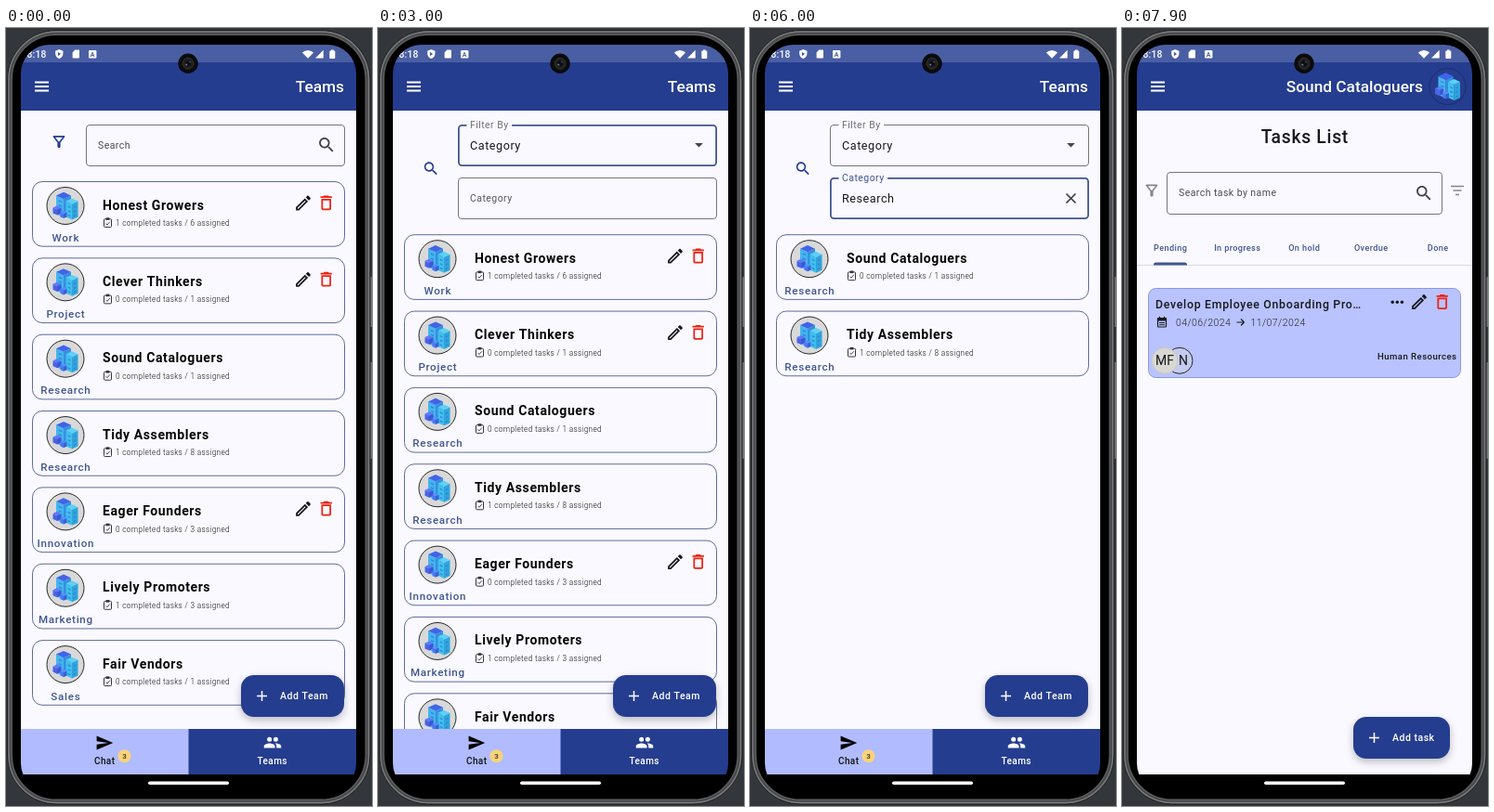
These frames come from a looping animation (394 by 838 pixels, 8000 ms). An HTML page with a canvas:

```html
<!DOCTYPE html>
<html lang="en">
<head>
<meta charset="utf-8">
<title>Teams app</title>
<style>
html, body { margin: 0; width: 100%; height: 100%; overflow: hidden; background: #33373c; }
canvas { display: block; width: 394px; height: 838px; }
</style>
</head>
<body>
<canvas id="stage"></canvas>
<script>
const W = 394, H = 838, LOOP = 8000, STEP = 100;
const NAVY = '#253d8f', SLATE = '#40568f', PAPER = '#faf9ff', INK = '#17181c', GREY = '#74757c', RED = '#f0200f';
const dpr = window.devicePixelRatio || 1;

function setup(cv) {
  cv.width = W * dpr;
  cv.height = H * dpr;
  const g = cv.getContext('2d');
  g.scale(dpr, dpr);
  return g;
}
const main = setup(document.getElementById('stage'));
const layer = document.createElement('canvas');
const over = setup(layer);
let c = main;

const icons = {
  edit: 'M14.06 9.02l.92.92L5.92 19H5v-.92l9.06-9.06M17.66 3c-.25 0-.51.1-.7.29l-1.83 1.83 3.75 3.75 1.83-1.83c.39-.39.39-1.02 0-1.41l-2.34-2.34c-.2-.2-.45-.29-.71-.29zm-3.6 3.19L3 17.25V21h3.75L17.81 9.94l-3.75-3.75z',
  bin: 'M6 19c0 1.1.9 2 2 2h8c1.1 0 2-.9 2-2V7H6v12zM8 9h8v10H8V9zm7.5-5l-1-1h-5l-1 1H5v2h14V4z',
  search: 'M15.5 14h-.79l-.28-.27C15.41 12.59 16 11.11 16 9.5 16 5.91 13.09 3 9.5 3S3 5.91 3 9.5 5.91 16 9.5 16c1.61 0 3.09-.59 4.23-1.57l.27.28v.79l5 4.99L20.49 19l-4.99-5zm-6 0C7.01 14 5 11.99 5 9.5S7.01 5 9.5 5 14 7.01 14 9.5 11.99 14 9.5 14z',
  filter: 'M7 6h10l-5.01 6.3L7 6zm-2.75-.39C6.27 8.2 10 13 10 13v6c0 .55.45 1 1 1h2c.55 0 1-.45 1-1v-6s3.72-4.8 5.74-7.39A1 1 0 0 0 18.95 4H5.04c-.83 0-1.3.95-.79 1.61z',
  send: 'M2 21l21-9L2 3v7l15 2-15 2z',
  people: 'M16 11a3 3 0 1 0 0-6 3 3 0 0 0 0 6zm-8 0a3 3 0 1 0 0-6 3 3 0 0 0 0 6zm0 2c-2.33 0-7 1.17-7 3.5V19h14v-2.5c0-2.33-4.67-3.5-7-3.5zm8 0c-.29 0-.62.02-.97.05 1.16.84 1.97 1.97 1.97 3.45V19h6v-2.5c0-2.33-4.67-3.5-7-3.5z',
  shield: 'M12 1L3 5v6c0 5.5 3.8 10.7 9 12 5.2-1.3 9-6.5 9-12V5zM9 7l7 5-7 5z',
  card: 'M18 2h-8L4 8v12c0 1.1.9 2 2 2h12c1.1 0 2-.9 2-2V4c0-1.1-.9-2-2-2z'
};
for (const k in icons) icons[k] = new Path2D(icons[k]);

function icon(name, x, y, col, s = 0.878) {
  c.save();
  c.translate(x, y);
  c.scale(s, s);
  c.translate(-12, -12);
  c.fillStyle = col;
  c.fill(icons[name], name === 'shield' ? 'evenodd' : 'nonzero');
  c.restore();
}

function text(s, x, y, size, ls, col, weight = 400, align = 'left') {
  c.font = `${weight} ${size}px Roboto, sans-serif`;
  c.letterSpacing = ls + 'px';
  c.textAlign = align;
  c.fillStyle = col;
  c.fillText(s, x + (align === 'center' ? ls / 2 : align === 'right' ? ls : 0), y);
}

function rect(x, y, w, h, col) {
  c.fillStyle = col;
  c.fillRect(x, y, w, h);
}

function paint(fill, stroke, lw) {
  if (fill) { c.fillStyle = fill; c.fill(); }
  if (stroke) { c.strokeStyle = stroke; c.lineWidth = lw; c.stroke(); }
}

function rr(x, y, w, h, r, fill, stroke, lw = 1) {
  c.beginPath();
  c.roundRect(x, y, w, h, r);
  paint(fill, stroke, lw);
}

function disc(x, y, r, fill, stroke, lw = 1) {
  c.beginPath();
  c.arc(x, y, r, 0, Math.PI * 2);
  paint(fill, stroke, lw);
}

function poly(col, ...p) {
  c.beginPath();
  for (let i = 0; i < p.length; i += 2) c.lineTo(p[i], p[i + 1]);
  paint(col);
}

function line(col, lw, ...p) {
  c.beginPath();
  for (let i = 0; i < p.length; i += 4) {
    c.moveTo(p[i], p[i + 1]);
    c.lineTo(p[i + 2], p[i + 3]);
  }
  paint(null, col, lw);
}

function shadow(blur, dy, alpha) {
  c.shadowColor = `rgba(0,0,0,${alpha})`;
  c.shadowBlur = blur * dpr;
  c.shadowOffsetY = dy * dpr;
}
const noShadow = () => { c.shadowColor = 'transparent'; };

// Isometric block: roof centre x,y, half width w, height h
function block(x, y, w, h, roof, left, right) {
  const d = w / 2.2;
  poly(left, x - w, y, x, y + d, x, y + d + h, x - w, y + h);
  poly(right, x + w, y, x, y + d, x, y + d + h, x + w, y + h);
  poly(roof, x - w, y, x, y - d, x + w, y, x, y + d);
}

function windows(x, y, w, rows) {
  for (let i = 0; i < rows; i++) {
    const v = y + i * 4.6;
    line('#2f86d2', 1.3, x - w * .65, v + 1.5, x - w * .25, v + 3, x + w * .25, v + 3, x + w * .65, v + 1.5);
  }
}

function buildings(x, y) {
  block(x - 2, y - 10, 8, 20, '#4064e8', '#45b4ee', '#368fe0');
  windows(x - 2, y - 6, 8, 3);
  block(x - 9, y + 3, 4.5, 6, '#5a7bf5', '#4a63e8', '#3f56d6');
  block(x + 7, y - 4, 6.5, 17, '#5ed0f6', '#40bfee', '#30a4dc');
  windows(x + 7, y, 6.5, 3);
  block(x - 2, y + 8, 3.5, 5, '#5a8cff', '#4778f0', '#3a5fd8');
}

function fab(x, y, w, label) {
  shadow(8, 3.5, .25);
  rr(x, y, w, 45, 14, NAVY);
  noShadow();
  const px = x + 22.5, py = y + 22.5;
  line('#fff', 1.5, px - 5.5, py, px + 5.5, py, px, py - 5.5, px, py + 5.5);
  text(label, x + 42, y + 26.3, 10.5, .5, '#fff', 500);
}

function header(title, right) {
  rect(16, 16, 361, 21, '#4a5ea3');
  rect(16, 37, 361, 52, NAVY);
  line('#fff', 1.8, 31, 58.5, 46, 58.5, 31, 63, 46, 63, 31, 67.5, 46, 67.5);
  text(title, right, 69, 17.3, 0, '#fff', 500, 'right');
}

function field(x, y, w, label, value, { focus = false, lift = 0, h = 45, col = '#4a4b52' } = {}) {
  const lw = focus ? 1.8 : 1;
  rr(x + lw / 2, y + lw / 2, w - lw, h - lw, 3.5, null, focus ? SLATE : GREY, lw);
  if (lift > .5) {
    c.font = '400 10.5px Roboto, sans-serif';
    c.letterSpacing = '.44px';
    rect(x + 9.5, y - 2, c.measureText(label).width + 7, 5, PAPER);
  }
  text(label, x + 13, y + 26.3 - 22.8 * lift, 10.5, .44, col);
  if (value) text(value, x + 13, y + 27, 12.6, .55, INK);
}

function caret(x, y, up) {
  const s = up ? -1 : 1;
  poly('#44464e', x - 4.4, y - 2.2 * s, x + 4.4, y - 2.2 * s, x, y + 2.2 * s);
}

// name, category, done, assigned, editable
const teams = [
  ['Honest Growers', 'Work', 1, 6, 1],
  ['Clever Thinkers', 'Project', 0, 1, 1],
  ['Sound Cataloguers', 'Research', 0, 1, 0],
  ['Tidy Assemblers', 'Research', 1, 8, 0],
  ['Eager Founders', 'Innovation', 0, 3, 1],
  ['Lively Promoters', 'Marketing', 1, 3, 0],
  ['Fair Vendors', 'Sales', 0, 1, 0]
];
const categories = ['Work', 'Project', 'Study', 'Research', 'Development', 'Innovation', 'Marketing',
  'Sales', 'Support', 'Training', 'Creativity', 'Analysis', 'Events', 'Administration'];

function teamCard([name, cat, done, all, own], y, pressed) {
  let fill = null;
  if (pressed) {
    fill = c.createLinearGradient(28, 0, 365, 0);
    fill.addColorStop(0, '#e9e9ee');
    fill.addColorStop(.1, '#e1e1e5');
    fill.addColorStop(.8, '#dfdfe3');
    fill.addColorStop(1, '#e6e6eb');
  }
  rr(28.5, y, 336, 69.7, 10.5, fill, '#4c5d92', .9);
  disc(64, y + 26, 20, '#d9d9da', '#111', .9);
  buildings(64, y + 25);
  text(cat, 64, y + 64, 11.6, .7, SLATE, 500, 'center');
  text(name, 104, y + 30, 14, .6, '#050505', 700);
  rr(105.5, y + 40.2, 8, 8.8, 1, null, '#33343a', 1);
  rect(107.7, y + 38.8, 3.6, 2.6, '#33343a');
  line('#33343a', .9, 107.5, y + 45, 109, y + 46.5, 109, y + 46.5, 111.8, y + 43.2);
  text(`${done} completed tasks / ${all} assigned`, 118, y + 47.6, 8.2, .36, '#111', 300);
  if (own) {
    icon('edit', 320, y + 23, INK);
    icon('bin', 344.7, y + 22.8, RED);
  }
}

function menu(y, h, alpha, items, first, pitch, rippleAt, edge) {
  c.save();
  c.globalAlpha = alpha;
  shadow(3.5, 1.5, .25);
  rr(86, y, 258, h, 3.5, '#ececf6');
  noShadow();
  if (edge) {
    const g = c.createLinearGradient(86, 0, 86 + edge, 0);
    g.addColorStop(0, '#d3d3dc');
    g.addColorStop(.3, '#c9c9d2');
    g.addColorStop(.75, '#d3d3dc');
    g.addColorStop(1, '#ececf6');
    rect(86, first + rippleAt * pitch - 19.4, edge, 38.8, g);
  }
  items.forEach((s, i) => text(s, 99, first + i * pitch + 4.5, 12.6, .55, INK));
  c.restore();
}

function navBar() {
  rect(16, 755, 181, 49, '#b0bcff');
  rect(196.5, 755, 180.5, 49, NAVY);
  icon('send', 106, 770, '#000', .84);
  text('Chat', 106, 792.6, 10, .4, '#111', 500, 'center');
  disc(127.5, 784.3, 7, '#fad27a');
  text('3', 127.5, 787.3, 8, 0, '#3a3320', 500, 'center');
  icon('people', 287, 769.6, '#fff', .84);
  text('Teams', 286.5, 792.6, 10, .4, '#fff', 500, 'center');
}

const clamp = v => Math.max(0, Math.min(1, v));

function teamsScreen(t) {
  const filtering = t >= 200, picked = t >= 2700, chosen = t >= 5500, second = t >= 4400;
  const lift1 = clamp((t - 1400) / 150), lift2 = clamp((t - 4400) / 150);
  const open1 = lift1 * (1 - clamp((t - 2600) / 150));
  const open2 = lift2 * (1 - clamp((t - 5400) / 150));
  const shift = picked ? 57.2 : 0;

  rect(16, 89, 361, 670, PAPER);
  header('Teams', 364);

  c.save();
  c.beginPath();
  c.rect(16, 89, 361, 666);
  c.clip();
  const list = chosen ? teams.filter(v => v[1] === 'Research') : teams;
  list.forEach((v, i) => teamCard(v, 165.5 + shift + i * 82.35, chosen && !i && t >= 7000));
  c.restore();

  if (!filtering) {
    icon('filter', 57, 122.5, NAVY, .8);
    field(86, 104, 279, 'Search', '');
    icon('search', 345, 126, '#3f4046');
  } else {
    icon('search', 57, picked ? 151.5 : 122.5, NAVY, .8);
    field(86, 104, 279, 'Filter By', picked ? 'Category' : '',
      { focus: lift1 > 0 && !second, lift: lift1, col: '#707178' });
    caret(345.5, 126.3, t >= 1300 && !picked);
  }
  if (picked) {
    field(86, 161, 279, 'Category', chosen ? 'Research' : '',
      { focus: second, lift: lift2, col: second ? SLATE : '#55565d' });
    if (t >= 4500) line('#3b3c42', 1.7, 340.5, 178.5, 350.5, 188.5, 350.5, 178.5, 340.5, 188.5);
  }

  fab(253, 697, 111, 'Add Team');
  navBar();

  if (open1) menu(150, 50, open1, ['Category'], 174.2, 0);
  if (open2) {
    const edge = t < 5300 ? 0 : Math.min(258, 85 + (t - 5300));
    menu(57, 559, open2, categories, 82.5, 38.77, 3, edge);
  }
}

function tasksScreen() {
  rect(16, 89, 361, 715, PAPER);
  header('Sound Cataloguers', 324);
  disc(350.5, 63, 19.5, null, '#1b2c6c');
  buildings(350.5, 62);

  text('Tasks List', 196.5, 124, 19.3, .7, INK, 500, 'center');
  icon('filter', 32, 175, '#85868d', .8);
  field(48, 155, 297, 'Search task by name', '', { h: 46 });
  icon('search', 325, 178, '#3f4046');
  line('#85868d', 1.7, 354, 170.5, 368, 170.5, 356.5, 175, 365.5, 175, 359, 179.5, 363, 179.5);

  ['Pending', 'In progress', 'On hold', 'Overdue', 'Done'].forEach((s, i) =>
    text(s, 52 + i * 72, 239.5, 9.15, .38, SLATE, 500, 'center'));
  rect(16, 255, 361, 1, '#d9d9e2');
  rr(34, 252.6, 36, 2.8, [2.5, 2.5, 0, 0], SLATE);

  rr(28.5, 280.5, 336, 96, 8, '#b8c3ff', '#8c99d6');
  text('Develop Employee Onboarding Pro…', 36, 301.7, 12.3, .72, INK, 500);
  for (let i = -1; i < 2; i++) disc(296.3 + i * 5.1, 295.3, 1.7, INK);
  icon('edit', 320, 295, INK);
  icon('bin', 344.7, 295, RED);

  rr(38.5, 312.5, 9, 9.5, 1, null, INK, 1.2);
  rect(38, 312, 10, 3.5, INK);
  line(INK, 1.2, 40.5, 310.8, 40.5, 313, 45.5, 310.8, 45.5, 313);
  line(INK, 1, 40, 317.5, 46, 317.5, 40, 319.7, 46, 319.7);
  text('04/06/2024', 58, 320.7, 10.5, .42, '#222328', 300);
  line(INK, 1.1, 123.5, 317, 131.5, 317, 128, 313.5, 131.5, 317, 128, 320.5, 131.5, 317);
  text('11/07/2024', 138.5, 320.7, 10.5, .42, '#222328', 300);

  disc(62, 358.3, 14, '#c5cbee', '#25262c');
  disc(46, 358.3, 14, '#d8d7d2', '#c3c3c4', .8);
  text('MF', 46, 363.3, 14, .2, INK, 400, 'center');
  text('N', 66, 363.3, 14, 0, INK, 400, 'center');
  text('Human Resources', 360, 357.3, 9.6, .45, INK, 500, 'right');
  fab(249, 742, 104, 'Add task');
}

function phoneBody() {
  rect(0, 0, W, H, '#33373c');
  rect(391, 268, 3, 54, '#77787a');
  rect(391, 360, 3, 104, '#77787a');
  rr(1.5, 2.5, 390.5, 833.5, 53, '#48494b', '#1d1e20', 1);
  rr(3, 4, 387.5, 830.5, 51, null, '#7a7b7d', 1.4);
  rr(6.2, 7.2, 381, 824, 48, '#000', '#5c5d5f', 1.4);
}

function statusBar() {
  text('8:18', 22.5, 31.7, 10.3, .2, '#fff', 500);
  icon('shield', 57.3, 28, '#fff', .46);
  icon('card', 75.3, 28, '#fff', .46);
  rr(89, 24, 8.4, 8.4, 1.2, '#fff');
  text('A', 93.2, 31, 7, 0, '#4a5ea3', 700, 'center');
  c.beginPath();
  c.moveTo(325, 32.7);
  c.arc(325, 32.7, 8.6, -Math.PI * .75, -Math.PI * .25);
  paint('#fff');
  poly('#fff', 333, 32.6, 341.7, 32.6, 341.7, 23.8);
  rr(348.3, 24.5, 6, 8.4, 1, '#fff');
  rect(350, 23.4, 2.6, 1.5, '#fff');
}

function camera() {
  disc(196, 38.2, 10.7, '#0b0b0c');
  disc(196, 38.2, 6, '#1f2021', '#303133');
  disc(196, 38.2, 3, '#0c0c0e');
  disc(194.3, 39.5, 1.1, '#77797d');
  disc(198, 36.6, .9, '#55575b');
}

function draw(t) {
  c = main;
  phoneBody();
  c.save();
  c.beginPath();
  c.roundRect(16, 18, 361, 805, 31);
  c.clip();
  const fade = clamp((t - 7000) / 700);
  if (fade < 1) teamsScreen(t);
  if (fade > 0) {
    c = over;
    c.clearRect(0, 0, W, H);
    tasksScreen();
    c = main;
    c.globalAlpha = fade * fade * (3 - 2 * fade);
    c.drawImage(layer, 0, 0, W, H);
    c.globalAlpha = 1;
  }
  rect(16, 804, 361, 20, '#000');
  rr(153, 811.5, 87, 3.4, 1.7, '#fff');
  statusBar();
  c.restore();
  camera();
}

const start = performance.now();
function tick() {
  const t = (performance.now() - start) % LOOP;
  draw(Math.floor(t / STEP) * STEP);
  requestAnimationFrame(tick);
}
tick();
</script>
</body>
</html>
```
